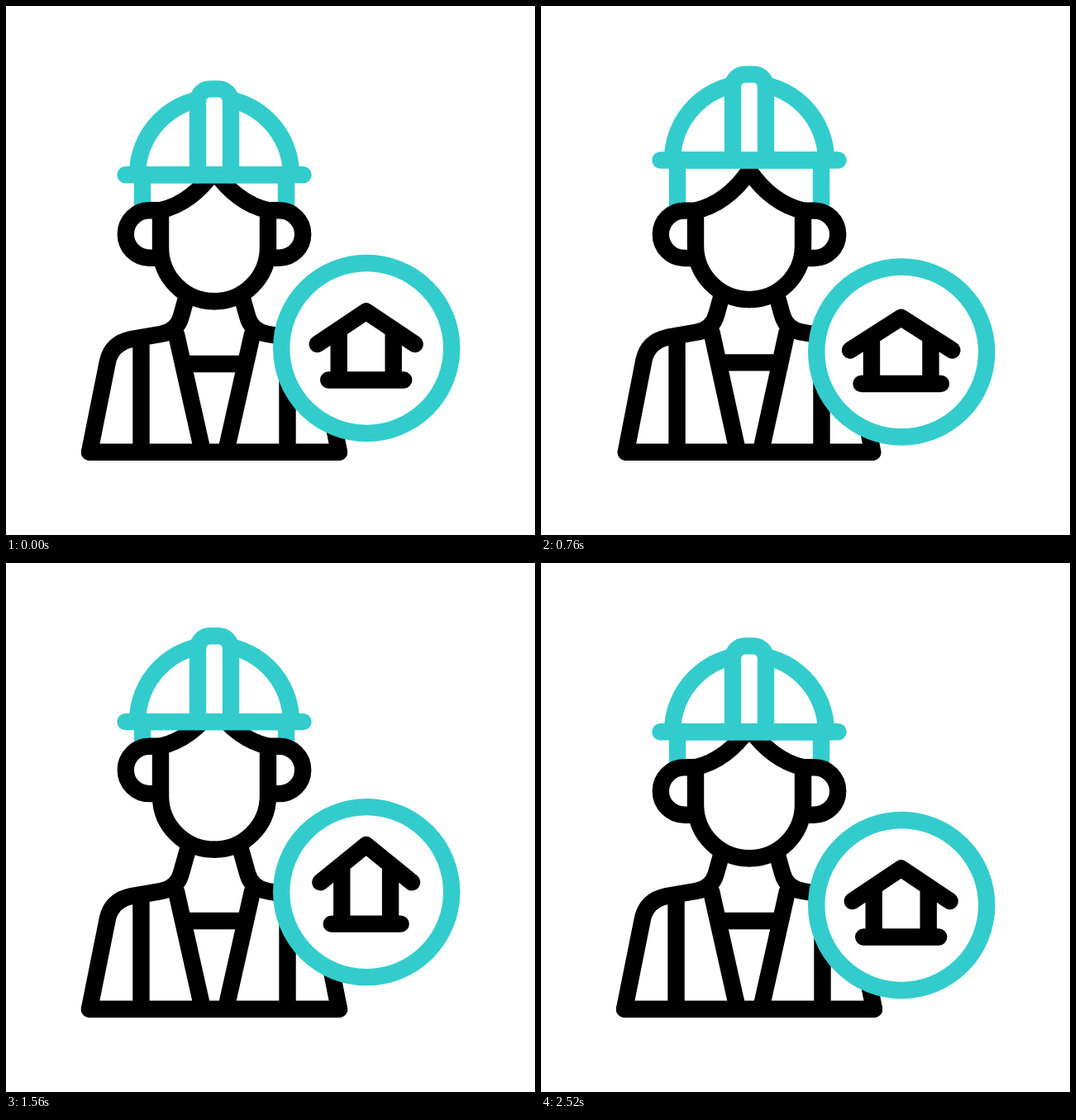
An HTML page with a canvas that plays this animation: 640 px wide and 640 px high, repeating every 2880 ms.

```html
<!DOCTYPE html>
<html lang="en">
<head>
<meta charset="utf-8">
<title>Builder</title>
<style>
html, body { margin: 0; width: 100%; height: 100%; overflow: hidden; background: #fff; }
canvas { display: block; width: 640px; height: 640px; }
</style>
</head>
<body>
<canvas id="stage" width="640" height="640"></canvas>
<script>
const ctx = document.getElementById('stage').getContext('2d');
const LOOP = 2880, STEP = 20, MID = 252, FLOOR = 539.7;
const BLACK = '#000', TEAL = '#33cccc';

// Sways between turning points [time, value] with sine easing
const sway = (...turns) => t => {
  const i = turns.findIndex(([time]) => time > t);
  if (i < 1) return 0;
  const [t0, a] = turns[i - 1], [t1, b] = turns[i];
  return a + (b - a) * (.5 - .5 * Math.cos(Math.PI * (t - t0) / (t1 - t0)));
};

// Two jumps: crouch, stretch, hang, crouch, stretch, settle
const crouch = sway([220, 0], [405, 1.04], [940, -.55], [1440, -.5], [1720, .8], [1955, -.45], [2360, 0]);
const headDrop = sway([220, 0], [400, 41], [1040, -27], [1550, -26], [1720, 26], [2040, -20], [2400, 0]);
const hatDrop = sway([220, 0], [400, 38], [870, -26], [1000, -21], [1240, -32], [1450, -29], [1750, 28], [2060, -40], [2400, 0]);
const badgeDrop = sway([220, 0], [510, 34], [920, -10], [1500, -20], [1780, 18], [2060, -20], [2400, 0]);
const squash = sway([380, 0], [640, 4], [1020, -1.6], [1520, -4], [1830, 6], [2080, -3], [2420, 0]);

function shape(color, draw, fill) {
  ctx.beginPath();
  draw();
  if (fill) {
    ctx.fillStyle = '#fff';
    ctx.fill();
  }
  ctx.strokeStyle = color;
  ctx.stroke();
}

function line(...p) {
  ctx.moveTo(p[0], p[1]);
  for (let i = 2; i < p.length; i += 2) ctx.lineTo(p[i], p[i + 1]);
}

function mirrored(draw) {
  draw();
  ctx.save();
  ctx.translate(2 * MID, 0);
  ctx.scale(-1, 1);
  draw();
  ctx.restore();
}

function drawBody(q, chin) {
  const sx = 1 + .08 * q, sy = Math.pow(sx, -1.3);
  const X = x => MID + (x - MID) * sx, Y = y => FLOOR + (y - FLOOR) * sy;
  const neckX = X(212), neckY = Y(375), neckTop = chin - 10;
  mirrored(() => shape(BLACK, () => {
    line(X(101), FLOOR, X(123), Y(430));
    ctx.quadraticCurveTo(X(128), Y(408), X(152), Y(403));
    ctx.lineTo(X(187), Y(397));
    ctx.quadraticCurveTo(X(207), Y(394), neckX, neckY);
    ctx.lineTo(neckX + (neckY - neckTop) * .28, neckTop);
    line(X(163.5), Y(403), X(163.5), FLOOR);
    line(X(206), Y(397), X(238), FLOOR);
  }));
  shape(BLACK, () => {
    line(X(101), FLOOR, X(403), FLOOR);
    line(X(216), Y(433), X(288), Y(433));
  });
}

function drawHead(dy, chin, barY) {
  const top = 247.3 + dy, jaw = chin - 65;
  mirrored(() => shape(TEAL, () => line(165, top, 165, barY)));
  ctx.fillStyle = '#fff';
  ctx.beginPath();
  ctx.moveTo(187, top);
  ctx.quadraticCurveTo(225, top - 9, MID, top - 48);
  ctx.quadraticCurveTo(279, top - 9, 317, top);
  ctx.lineTo(317, jaw);
  ctx.arc(MID, jaw, 65, 0, Math.PI);
  ctx.fill();
  mirrored(() => {
    shape(BLACK, () => {
      ctx.moveTo(187, top + 57.4);
      ctx.lineTo(173.5, top + 57.4);
      ctx.arc(173.5, top + 28.7, 28.7, Math.PI / 2, Math.PI * 1.5);
      ctx.lineTo(187, top);
    }, true);
    shape(BLACK, () => {
      ctx.moveTo(MID, top - 48);
      ctx.quadraticCurveTo(225, top - 9, 187, top);
      ctx.lineTo(187, jaw);
      ctx.arc(MID, jaw, 65, Math.PI, Math.PI / 2, true);
    });
  });
}

function drawHelmet(y) {
  shape(TEAL, () => {
    ctx.arc(MID, y, 93, Math.PI, 0);
    ctx.closePath();
  }, true);
  const top = y - 103.8, r = 15;
  shape(TEAL, () => {
    ctx.moveTo(MID - 20, y);
    ctx.arcTo(MID - 20, top, MID, top, r);
    ctx.arcTo(MID + 20, top, MID + 20, y, r);
    ctx.lineTo(MID + 20, y);
  }, true);
  shape(TEAL, () => line(144.5, y, 359.5, y));
}

function drawBadge(y, wide) {
  ctx.save();
  ctx.translate(436.2, y);
  shape(TEAL, () => ctx.arc(0, 0, 103, 0, Math.PI * 2), true);
  // the roof stretches further than it squashes
  const apex = wide < 0 ? wide * 3.5 : wide;
  const eave = 59 + wide, wall = 33 + wide, base = 45.5 + wide, baseY = 38.5;
  const eaveY = -5 + apex * .35 + wide * .7, apexY = -44.5 + apex;
  const wallY = apexY + (eaveY - apexY) * wall / eave;
  ctx.translate(-.5, 0);
  shape(BLACK, () => {
    line(-eave, eaveY, 0, apexY, eave, eaveY);
    line(-wall, wallY, -wall, baseY);
    line(wall, wallY, wall, baseY);
    line(-base, baseY, base, baseY);
  });
  ctx.restore();
}

function render(t) {
  ctx.fillStyle = '#fff';
  ctx.fillRect(0, 0, 640, 640);
  ctx.lineWidth = 20.4;
  ctx.lineCap = ctx.lineJoin = 'round';
  const q = crouch(t), head = headDrop(t);
  const chin = 357.3 + head * .42 + q * 16.3;
  const barY = 204.2 + hatDrop(t);
  drawBody(q, chin);
  drawHead(head, chin, barY);
  drawHelmet(barY);
  drawBadge(414 + badgeDrop(t), squash(t));
}

const start = performance.now();
function tick() {
  const t = Math.max(0, performance.now() - start) % LOOP;
  render(Math.floor(t / STEP) * STEP);
  requestAnimationFrame(tick);
}
tick();
</script>
</body>
</html>
```
